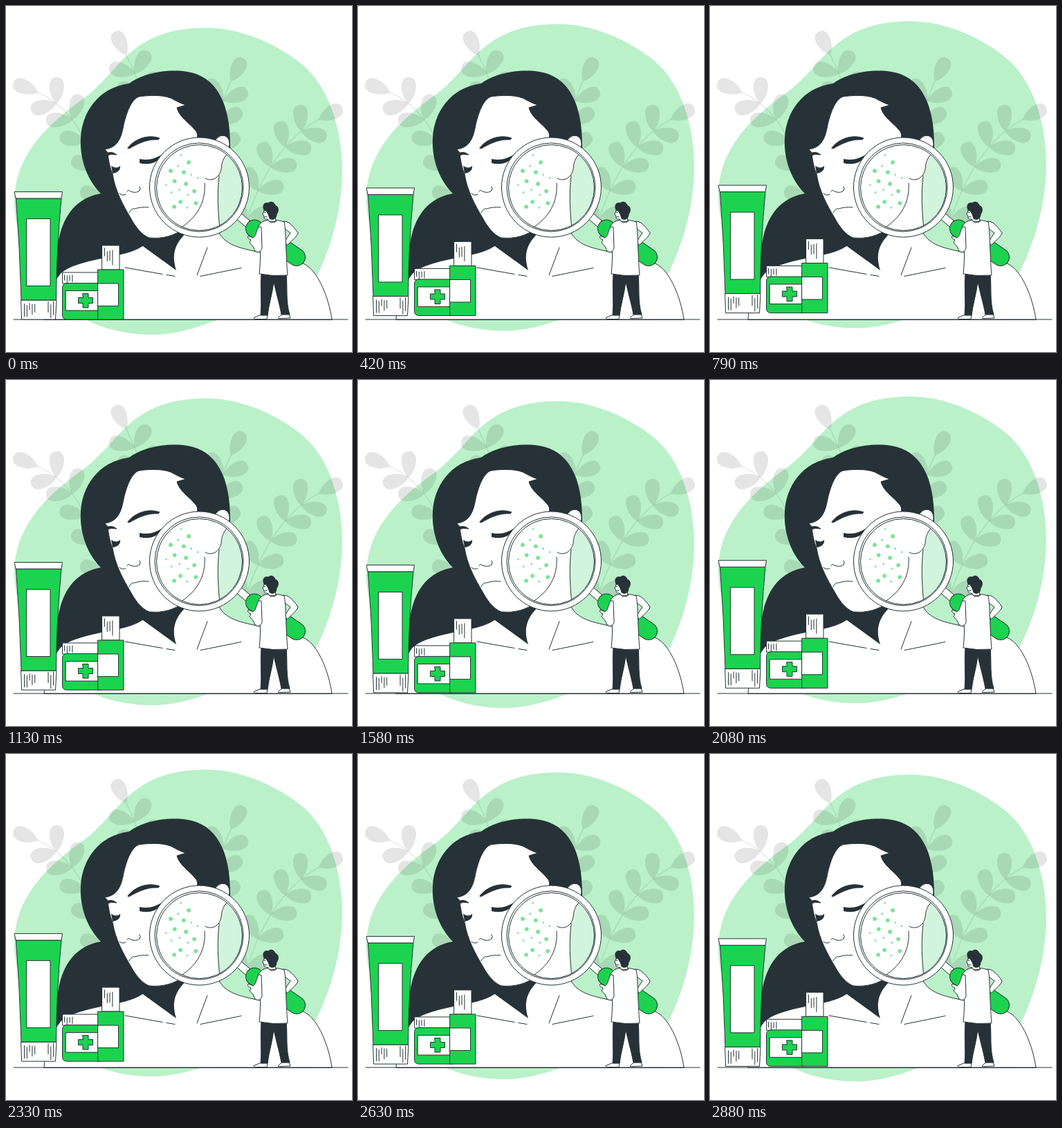
Write an HTML page with a canvas that moves like this. It is 500 px wide and 500 px high and loops after 2930 ms.

```html
<!DOCTYPE html>
<html lang="en">
<head>
<meta charset="utf-8">
<title>Skin check</title>
<style>
html, body { margin: 0; width: 100%; height: 100%; overflow: hidden; background: #fff; }
canvas { display: block; width: 500px; height: 500px; }
</style>
</head>
<body>
<canvas id="stage"></canvas>
<script>
const LOOP = 2930, FRAME = 1000 / 24, PERIOD = 1500, LIFT = 10;
const DARK = '#263238', GREEN = '#1cd34f', PALE = '#baf1c9', SPOT = '#77e696';
const SHADE = 'rgba(0,0,0,.1)', STEM = 'rgba(0,0,0,.08)';

const canvas = document.getElementById('stage');
const ctx = canvas.getContext('2d');
const ratio = window.devicePixelRatio || 1;
canvas.width = canvas.height = 500 * ratio;
ctx.lineJoin = ctx.lineCap = 'round';

function paint(path, fill, stroke, width = 1) {
  if (fill) { ctx.fillStyle = fill; ctx.fill(path); }
  if (stroke) { ctx.strokeStyle = stroke; ctx.lineWidth = width; ctx.stroke(path); }
}
const shape = (d, fill, stroke = DARK) => paint(new Path2D(d), fill, stroke);
const line = (d, width = 1, color = DARK) => paint(new Path2D(d), null, color, width);

function rect(x, y, w, h, fill, r = 0) {
  const p = new Path2D();
  p.roundRect(x, y, w, h, r);
  paint(p, fill, DARK);
}

function circle(x, y, r, fill, stroke) {
  const p = new Path2D();
  p.arc(x, y, r, 0, Math.PI * 2);
  paint(p, fill, stroke);
}

function lifted(dy, drawPart) {
  ctx.save();
  ctx.translate(0, dy);
  drawPart();
  ctx.restore();
}

// Teardrop growing from its narrow base.
function leaf(x, y, angle, len = 38, w = 20) {
  ctx.save();
  ctx.translate(x, y);
  ctx.rotate(angle);
  const p = new Path2D();
  p.moveTo(0, 0);
  p.bezierCurveTo(len * .25, -w * .55, len, -w * .85, len, 0);
  p.bezierCurveTo(len, w * .85, len * .25, w * .55, 0, 0);
  paint(p, SHADE);
  ctx.restore();
}

// Quadratic stem from its tip (x0, y0), with a leaf pair at each even step.
function plant(x0, y0, x1, y1, x2, y2, pairs) {
  line(`M${x0} ${y0}Q${x1} ${y1} ${x2} ${y2}`, 1.8, STEM);
  const mix = (a, b, t) => a + (b - a) * t;
  for (let i = 0; i <= pairs; i++) {
    const t = i / pairs;
    const ax = mix(x0, x1, t), ay = mix(y0, y1, t);
    const bx = mix(x1, x2, t), by = mix(y1, y2, t);
    const dir = Math.atan2(ay - by, ax - bx);
    const spread = i ? [-.92, .92] : [0];
    spread.forEach(s => leaf(mix(ax, bx, t), mix(ay, by, t), dir + s));
  }
}

function plants() {
  plant(46, 125, 118, 155, 142, 282, 5);
  plant(174, 71, 186.5, 96.5, 197, 128, 2);
  plant(325, 109, 305, 147, 307, 210, 3);
  plant(452, 164, 385, 199, 348, 308, 5);
}

function blob() {
  shape('M287 31.5C335 31 385 51 425 82C469 117 486 182 486 240C485 298 469 351 448 393'
    + 'C426 435 356 436 302 455C270 467 243 475 210 475C172 474 145 468 115 453'
    + 'C60 427 12 347 12 285C12 215 60 171 113 133C145 109 163 77 192 58C219 39 251 32 287 31.5Z', PALE, null);
}

function woman() {
  // hair
  shape('M178 112C196 98 232 90 262 95C302 101 325 138 324 205L250 260L215 345L150 380L74 400'
    + 'C68 325 88 280 137 271C120 254 106 225 108 190C110 155 132 118 178 112Z', DARK, null);
  // shoulders
  shape('M55 453C57 420 66 404 76 390C86 374 125 367 160 360C185 355 199 348 208 337L300 300'
    + 'L308 328C318 345 335 349 362 355C400 362 425 368 436 376C452 388 466 420 471 453Z', '#fff');
  // neck shadow
  shape('M195 345L210 335C228 337 243 331 258 322L262 326C246 342 238 356 246 382Z', DARK, null);
  line('M172 378L226 387.5M232 388.5L244 390.5M291 349L276 389M281 390.5L340 378.5');
  // face
  shape('M143 207C158 205 166 196 170 172C176 146 184 134 192 131C206 129 224 128 238 133'
    + 'C246 137 252 141 260 143L247 147C250 160 264 168 274 180C277 184 277 187 276 192L300 215L300 300'
    + 'L258 322C243 331 228 337 207 335C196 331 187 319 180 306C170 289 158 268 154 243'
    + 'C150 234 148 222 147 212Z', '#fff');
  shape('M301 197C305 188 312 186 317 188C323 191 324 198 322 206L301 210Z', '#fff');
  // brows, lids, nose, mouth
  shape('M176 205C186 192 205 185 222 191Q221 194 216 193C203 193 190 199 178 206Z', DARK);
  shape('M145 213Q153 209 160 215Q152 213 146 216Z', DARK);
  shape('M193 221C206 224 217 220 226 214C222 225 209 231 193 227Z', DARK, null);
  shape('M152 231Q160 236 165 231Q166 240 154 242Z', DARK, null);
  line('M164 271Q169 275 173 272M175 268Q177 265 180 268Q188 271 193 267Q195 264 193 261');
  line('M178 299Q181 292 186 293Q195 290 206 291');
}

// Golden-angle scatter, every other spot large.
function spots(count) {
  for (let i = 0; i < count; i++) {
    const r = Math.sqrt((i + .5) / count), a = i * 2.4;
    circle(256 + 25 * r * Math.cos(a), 257 + 45 * r * Math.sin(a), i % 2 ? 1.4 : 2.9, SPOT);
  }
}

function magnifier() {
  shape('M333 307L340 300L357 314L350 322Z', '#fff');
  const grip = 'M359 321.5L420 363';
  line(grip, 26);
  line(grip, 24, GREEN);
  circle(279.5, 262, 72, '#fff', DARK);
  circle(279, 262, 64, '#fff', DARK);
  ctx.save();
  ctx.beginPath();
  ctx.arc(279.5, 262.5, 62, 0, Math.PI * 2);
  ctx.clip();
  ctx.fillStyle = '#d2f3dc';
  ctx.fillRect(210, 195, 140, 135);
  shape('M200 190H330L326 207C317 217 313 222 311 240L308 245C305 270 306 300 310 330H200Z', '#fff', null);
  line('M326 207C316 217 312 222 311 236C309 247 298 255 288 249M308 245C305 270 306 300 310 330');
  line('M287 256C289 282 277 306 250 322');
  ctx.restore();
  circle(279.5, 262.5, 62, null, DARK);
  spots(18);
}

function doctor() {
  // shoes and trousers
  shape('M369 446L359 450Q357 452.5 361 452.5H377L378 446Z', '#fff');
  shape('M398 446L394 450Q392 452.5 396 451.5L411 451L409 445Z', '#fff');
  shape('M369 386H405C407 410 404 425 410 446H398C394 425 390 414 387 398C385 416 380 430 378 447H368C370 426 367 407 369 386Z', DARK);
  // far arm, coat, near arm
  shape('M401 311C408 311 413 315 422 328C421 333 412 340 406 346L403 340L411 328L403 322Z', '#fff');
  shape('M372 311C382 308 394 309 402 312C405 325 404 355 407 389Q386 391 366 387C369 360 367 340 364 322Q365 315 372 311Z', '#fff');
  shape('M365 319C361 326 362 332 357 335L350 332Q348 336 354 338L352 342Q358 347 360 354Q367 359 370 350L369 320Z', '#fff');
  // head
  shape('M374 293L371 301L373 304Q372 309 378 308L381 312L390 311L388 298Z', '#fff');
  shape('M373 295C370 288 373 283 379 285C383 281 388 284 389 288C395 290 394 297 391 301C391 308 385 310 381 307L379 301L376 296Z', DARK);
  line('M373 298L375 298.5M374 305L377 304.5M380 311Q385 315 391 311');
}

// Uneven grooves on a lid, with lengths from a seeded hash.
function grooves(x, y, h, count) {
  const rnd = n => Math.abs(Math.sin((x + n) * 12.9898) * 43758.5453) % 1;
  for (let i = 0; i < count; i++) {
    const top = y + 2 + rnd(i) * h * .2;
    line(`M${x + i * 3.8} ${top}V${top + h * (.25 + .45 * rnd(i + 50))}`);
  }
}

function products() {
  // tube
  shape('M22 425H73L71.5 453H23Z', '#fff');
  grooves(26.5, 425, 28, 5);
  grooves(61, 425, 28, 3);
  shape('M14.5 278H80Q73 350 72.5 425H22Q20 350 14.5 278Z', GREEN);
  shape('M12.5 268.5H81.5L80 278H14.5Z', '#fff');
  rect(30, 307.5, 34, 97, '#fff');
  // jar
  rect(82, 385, 56, 16, '#fff');
  grooves(84.5, 385, 16, 4);
  rect(81.5, 400.5, 60, 52.5, GREEN, 6);
  rect(86.5, 411.5, 52, 28.5, '#fff');
  shape('M111 415.5h8v6h6.5v8h-6.5v6.5h-8v-6.5h-6.5v-8h6.5Z', GREEN);
  // bottle
  rect(139, 346, 25, 35, '#fff');
  grooves(142.5, 346, 35, 4);
  rect(133, 381, 37, 72, GREEN);
  rect(133, 401, 29.5, 32.5, '#fff');
}

function draw(now) {
  const frame = Math.floor((now % LOOP + 5) / FRAME) % 70;
  const phase = frame * FRAME % PERIOD / PERIOD;
  const dy = -LIFT * (1 - Math.abs(1 - 2 * phase));
  ctx.setTransform(ratio, 0, 0, ratio, 0, 0);
  ctx.fillStyle = '#fff';
  ctx.fillRect(0, 0, 500, 500);
  lifted(dy, blob);
  plants();
  woman();
  line('M11 453H494');
  magnifier();
  doctor();
  lifted(dy, products);
}

let start;
function tick(now) {
  start ??= now;
  draw(now - start);
  requestAnimationFrame(tick);
}
draw(0);
requestAnimationFrame(tick);
</script>
</body>
</html>
```
